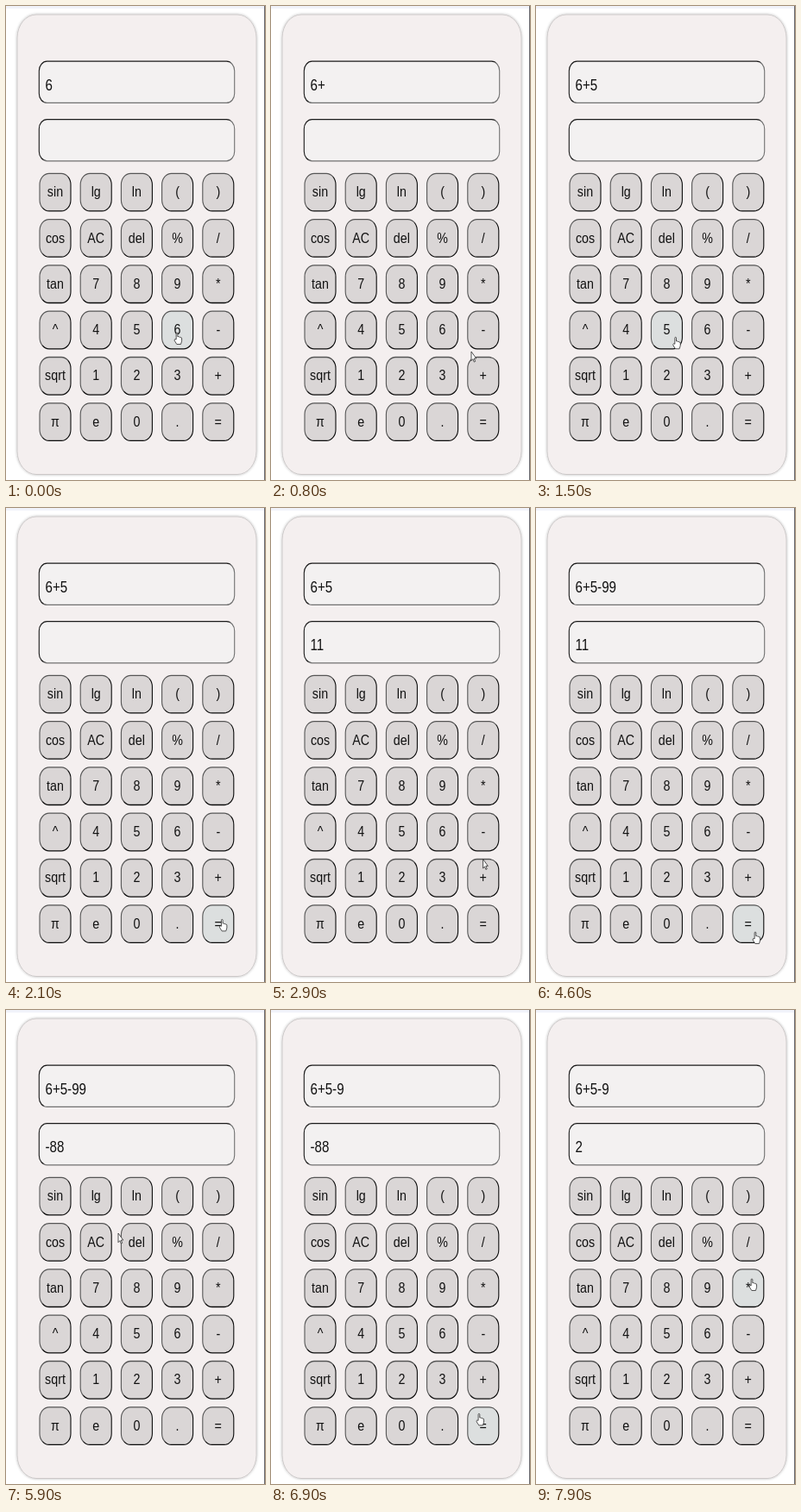
An HTML page that plays this animation: 300x550 px, repeating every 8000 ms.

```html
<!DOCTYPE html>
<html lang="en">
<head>
<meta charset="utf-8">
<title>Calculator</title>
<style>
  html, body { margin: 0; width: 100%; height: 100%; overflow: hidden; background: #fff; }
  svg { display: block; width: 100vw; height: 100vh; }
  text { font-family: "Liberation Sans", Arial, sans-serif; fill: #111; }
  .key text { font-size: 17px; text-anchor: middle; }
  .key rect { fill: #dad6d6; stroke: url(#outset); stroke-width: 1.3; }
  .key.hover rect { fill: #dcdfdf; }
  .screen rect { fill: #f3f1f1; stroke: url(#inset); stroke-width: 1.3; }
  .screen text { font-size: 18px; }
  .pointer path { fill: #fff; stroke: #333; stroke-width: .9; stroke-linejoin: round; }
</style>
</head>
<body>
<svg id="stage" viewBox="0 0 300 550" preserveAspectRatio="none">
  <defs>
    <linearGradient id="outset" x2="1" y2="1">
      <stop offset=".48" stop-color="#555"/><stop offset=".52" stop-color="#0a0a0a"/>
    </linearGradient>
    <linearGradient id="inset" x2="1" y2="1">
      <stop offset=".49" stop-color="#1a1a1a"/><stop offset=".51" stop-color="#707070"/>
    </linearGradient>
    <filter id="shadow" x="-10%" y="-10%" width="120%" height="120%">
      <feDropShadow dx="0" dy="0" stdDeviation="1.6" flood-color="#000" flood-opacity=".3"/>
    </filter>
  </defs>
  <rect width="300" height="550" fill="#fff"/>
  <rect width="300" height="3" fill="#f1f3fa"/>
  <rect x="299" width="1" height="550" fill="#66666c"/>
  <rect x="13" y="10" width="277" height="533.5" rx="22" ry="27" fill="#f4efef"
        stroke="#c4c1c1" stroke-width=".8" filter="url(#shadow)"/>
</svg>
<script>
const LOOP = 8000, STEP = 100, REST = 150;
const NARROW = 0.84; // the whole calculator is squeezed sideways
const KEY = { x: 39, y: 194.3, width: 36, height: 43.6, dx: 47.2, dy: 53.3 };
const ROWS = ["sin lg ln ( )", "cos AC del % /", "tan 7 8 9 *", "^ 4 5 6 -", "sqrt 1 2 3 +", "π e 0 . ="];

// Pointer stops; those with a key press it on arrival.
const stops = [
  { at: 0, x: 198, y: 379, key: "6" },
  { at: 500, x: 243, y: 431, key: "+" },
  { at: 800, x: 232, y: 401 },
  { at: 1300, x: 157, y: 380, key: "5" },
  { at: 1800, x: 241, y: 458 },
  { at: 2200, x: 252, y: 481, key: "=" },
  { at: 3200, x: 243, y: 378, key: "-" },
  { at: 3700, x: 207, y: 326 },
  { at: 3900, x: 207, y: 326, key: "9" },
  { at: 4100, x: 207, y: 326, key: "9" },
  { at: 4600, x: 254, y: 492 },
  { at: 4900, x: 253, y: 491, key: "=" },
  { at: 5400, x: 240, y: 404 },
  { at: 5900, x: 130, y: 259 },
  { at: 6200, x: 152, y: 269, key: "del" },
  { at: 7000, x: 247, y: 482, key: "=" },
  { at: 7500, x: 175, y: 282 },
  { at: 7900, x: 250, y: 312 }
];

const stage = document.getElementById("stage");

function add(parent, tag, attrs = {}, content = "") {
  const node = document.createElementNS("http://www.w3.org/2000/svg", tag);
  for (const name in attrs) node.setAttribute(name, attrs[name]);
  node.textContent = content;
  return parent.appendChild(node);
}

function addBox(kind, x, y, width, height, radius, textX, textY, label) {
  const transform = `translate(${x} ${y}) scale(${NARROW} 1)`;
  const group = add(stage, "g", { class: kind, transform });
  add(group, "rect", { width: width / NARROW, height, rx: radius });
  const text = add(group, "text", { x: textX / NARROW, y: textY }, label);
  return { group, text };
}

const addScreen = y => addBox("screen", 38.3, y, 226.4, 48.2, 11, 7.2, 33.8, "").text;

function addKey(label, column, row) {
  const { width, height, dx, dy } = KEY;
  const x = KEY.x + column * dx, y = KEY.y + row * dy;
  const { group } = addBox("key", x, y, width, height, 13, width / 2, 27, label);
  const contains = (px, py) => px >= x && px <= x + width && py >= y && py <= y + height;
  return { group, contains };
}

const topScreen = addScreen(64.2);
const bottomScreen = addScreen(131.6);
const keys = ROWS.flatMap((row, r) => row.split(" ").map((label, c) => addKey(label, c, r)));

const pointer = add(stage, "g", { class: "pointer" });
const arrow = add(pointer, "path", { d: "M0 0V11.5L2 9.3L3.6 13L5 12.2L3.5 8.6H6.2Z" });
const hand = add(pointer, "path", {
  d: "M-.9 8.5V1Q-.9 0 0 0Q.9 0 .9 1V5Q2.4 4.3 2.8 5.6Q4.2 5 4.5 6.2Q6 5.8 6 7.3V10.5L4.8 14.5H-.2L-3 10Q-3.4 8.4-2.2 8Z"
});

const sum = expression => expression.match(/[+-]?\d+/g).reduce((total, term) => total + Number(term), 0);

function calculate(t) {
  let expression = "", answer = "";
  for (const { at, key } of stops) {
    if (at > t || !key) continue;
    if (key === "=") answer = sum(expression);
    else if (key === "del") expression = expression.slice(0, -1);
    else expression += key;
  }
  return { expression, answer };
}

function pointerAt(t) {
  const index = stops.findIndex(stop => stop.at > t);
  if (index < 0) return stops[stops.length - 1];
  const from = stops[index - 1], to = stops[index];
  const leave = from.at + (from.key ? REST : 0);
  const u = Math.max(0, (t - leave) / (to.at - leave));
  const k = 1 - (1 - u) ** 2 * (1 + 2 * u);
  return { x: from.x + (to.x - from.x) * k, y: from.y + (to.y - from.y) * k };
}

function draw(t) {
  const { expression, answer } = calculate(t);
  topScreen.textContent = expression;
  bottomScreen.textContent = answer;
  const { x, y } = pointerAt(t);
  let hovering = false;
  for (const key of keys) {
    const over = key.contains(x, y);
    key.group.classList.toggle("hover", over);
    hovering ||= over;
  }
  pointer.setAttribute("transform", `translate(${x} ${y}) scale(.93)`);
  hand.style.display = hovering ? "" : "none";
  arrow.style.display = hovering ? "none" : "";
}

const start = performance.now();
function tick() {
  const t = (performance.now() - start) % LOOP;
  draw(Math.floor(t / STEP) * STEP);
  requestAnimationFrame(tick);
}
tick();
</script>
</body>
</html>
```
